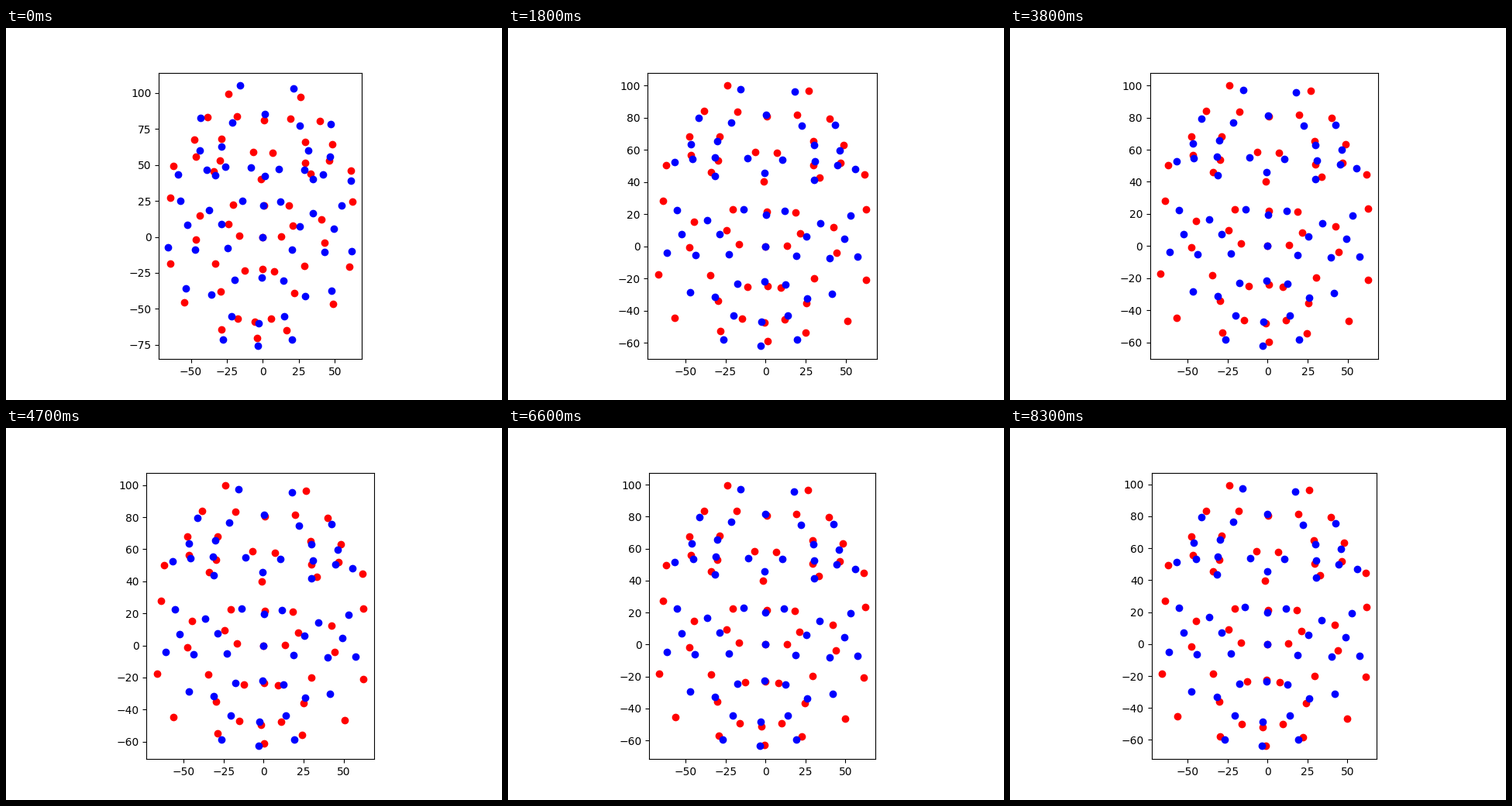
Recreate the animation shown at these times as a matplotlib script. Size 640 by 480 pixels, loop 8.4 s.

```python
import numpy as np
import matplotlib.pyplot as plt
from matplotlib.animation import FuncAnimation

FRAMES, STEP = 84, 100

# Half of each face; the other half is its mirror image.
RED_HALF = [
    (25.2, 97.9), (39, 81.4), (18.6, 82.3), (48, 65.4), (29, 66.4),
    (46.5, 53.8), (29.8, 51.6), (6.8, 57.9), (61.8, 47), (33.6, 44.1),
    (63.2, 25.2), (19.4, 21.6), (43.4, 13.3), (22.8, 8.5), (45.8, -2.9),
    (15, 0.5), (63.8, -19.6), (31.8, -19.4), (10.4, -23.7), (53, -46),
    (27.2, -36.5), (26, -58.1), (13, -50.2)]
RED_MID = [(0.6, 80.4), (-1.4, 39.7), (0.6, 21.3), (-0.5, -22.6),
           (-2.8, -52.3), (-0.9, -63.8)]
BLUE_HALF = [
    (16.5, 96.4), (41.9, 77.5), (21.8, 75.8), (46.1, 61.3), (30, 64),
    (44.7, 51.6), (30.7, 53.5), (10.6, 53.5), (56.6, 49.1), (31, 42.6),
    (54.2, 21.1), (12.8, 22.7), (35.3, 15.7), (27.1, 6.5), (50.8, 5.6),
    (59.8, -6.2), (42.1, -7.2), (21, -6.3), (44.8, -30.5), (29, -33.6),
    (15.2, -25), (17.2, -44.8), (23, -59.8)]
BLUE_MID = [(0.1, 81.4), (-0.3, 45.5), (0.1, 19.9), (-0.8, -23.2),
            (-2.8, -48.9), (-3.3, -63.9)]


def build(half, mid):
    """Mirror a half face, then lean and tilt it a little."""
    x, y = np.transpose(half)
    mx, my = np.transpose(mid)
    lean = -1.8 + 0.03 * y
    xs = np.concatenate([lean - x, lean + x, mx])
    height = np.concatenate([y, y, my])
    ys = height - (0.024 + 0.0003 * height) * xs
    return np.array([xs, ys]), height


RED, RED_H = build(RED_HALF, RED_MID)
BLUE, BLUE_H = build(BLUE_HALF, BLUE_MID)

# Red shifts: mouth opening, blinking and smiling.
rx, side = RED[0], abs(RED[0])
mouth = np.clip((-30 - RED_H) / 20, 0, 1) * (side < 35)
lips = (abs(RED_H + 23) < 3) & (side < 15)
lids = (abs(RED_H - 43) < 3) & (side > 20) & (side < 45)

OPEN = np.array([-(3 + 0.1 * rx) * mouth - 0.025 * rx * (RED_H < 20),
                 0.6 * (RED_H > 20) + 0.012 * rx * (RED_H > 20)
                 - 6.5 * mouth])
BLINK = np.array([0 * rx, 1.7 - 0.012 * rx - 5 * lids - 2.7 * lips
                  + 0.7 * mouth])
SMILE = np.array([0.3 + 0.015 * rx * (RED_H < -10) + 1.9 * mouth
                  + 1.5 * lips,
                  0.6 - 0.012 * rx + 4.8 * mouth - 2.6 * lips])

# Blue stretch: widening and lift depend on height on the face.
LEVELS = [-64, -46, -30, -7, 6, 21, 40, 45, 49, 52, 63, 77, 97]
LIFT = [-12, -10.7, -6, -2.5, 1.5, 2.2, 0, -2.3, -8, -6.3, -2.8, 3, 8]
WIDEN = [.04, .07, .13, .07, 0, .03, .1, .1, .07, -.12, 0, .08, .13]
STRETCH = np.array([BLUE[0] * np.interp(BLUE_H, LEVELS, WIDEN)
                    + 1.5 * (BLUE_H > 40),
                    np.interp(BLUE_H, LEVELS, LIFT)])


def faces(t):
    opened = np.interp(t, [0, 1], [1, 0])
    blink = np.interp(t, [0, 1, 1.2, 1.8], [0, 1, 1, 0])
    smile = np.interp(t, [1.2, 1.8, 3.2, 3.8, 5.7, 8.4],
                      [0, 0.9, 1.2, 0.75, 0.25, 0])
    calm = np.interp(t, [0, 1, 1.2, 1.8, 2.2], [1, 0.87, 0.84, 0.1, 0])

    red = RED + opened * OPEN + blink * BLINK + smile * SMILE
    gain = np.select([BLUE_H > 75, BLUE_H < -40],
                     [calm, calm ** 3 - 0.12 * smile],
                     calm - 0.25 * smile)
    blue = BLUE + gain * STRETCH
    blue[1] += 0.8 * smile * (BLUE_H < 10)
    # The nose tip is the fixed origin of both faces.
    return [np.column_stack([face, (0, 0)]) for face in (red, blue)]


fig, ax = plt.subplots(figsize=(6.4, 4.8), dpi=100)
ax.set_aspect("equal")
dots = [ax.plot([], [], "o", color=c)[0] for c in ("red", "blue")]


def draw(i):
    for line, face in zip(dots, faces(i * STEP / 1000)):
        line.set_data(*face)
    ax.relim()
    ax.autoscale_view()
    return dots


anim = FuncAnimation(fig, draw, frames=FRAMES, interval=STEP, repeat=True,
                     repeat_delay=0)
plt.show()
```
